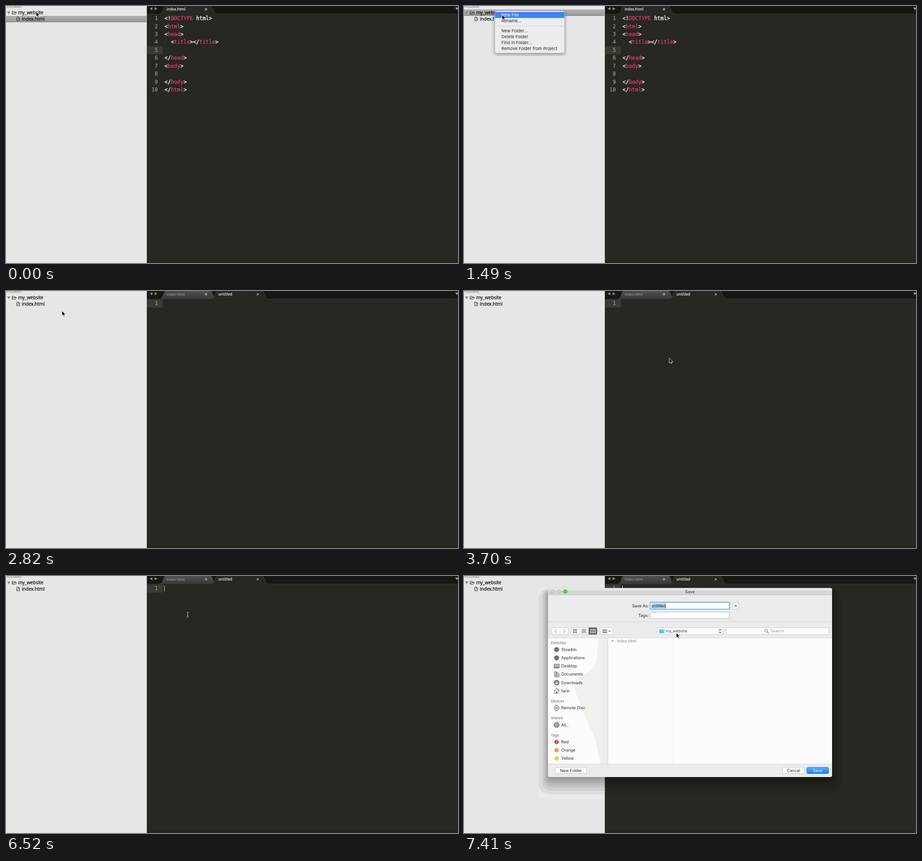
An HTML page with a canvas for the animation above (8 s loop, 991 px wide and 565 px high).

```html
<!DOCTYPE html>
<html lang="en">
<head>
<meta charset="utf-8">
<title>New file in the editor</title>
<style>
  html, body { margin: 0; width: 100%; height: 100%; overflow: hidden; background: #272822; }
  canvas { display: block; }
</style>
</head>
<body>
<canvas id="stage" width="991" height="565"></canvas>
<script>
const c = document.getElementById('stage').getContext('2d');
const LOOP = 8000;
const UI = 'Inter, Roboto, sans-serif';
const TREE = '"Open Sans", "Noto Sans", sans-serif';
const MONO = '11.55px "DejaVu Sans Mono", monospace';

const CODE = ['<!DOCTYPE html>', '<html>', '<head>', '  <title></title>', '',
  '</head>', '<body>', '', '</body>', '</html>'];

// Pointer moves: first step, last step, number of steps, end point
const START = [66, 12.5];
const MOVES = [
  [1050, 1640, 5, 93, 22.5],
  [2820, 3110, 3, 208, 104],
  [3410, 3700, 3, 450, 147.5],
  [4750, 5780, 8, 398, 81],
  [6820, 7410, 5, 465.5, 125]
];

function rect(x, y, w, h, fill) {
  c.fillStyle = fill;
  c.fillRect(x, y, w, h);
}

function box(x, y, w, h, r, fill, stroke) {
  c.beginPath();
  c.roundRect(x, y, w, h, r);
  paint(fill, stroke);
}

function dot(x, y, r, fill, stroke) {
  c.beginPath();
  c.arc(x, y, r, 0, 7);
  paint(fill, stroke);
}

function paint(fill, stroke, width = 1) {
  if (fill) { c.fillStyle = fill; c.fill(); }
  if (stroke) { c.strokeStyle = stroke; c.lineWidth = width; c.stroke(); }
}

function shape(d, fill, stroke, width = 1, x = 0, y = 0) {
  const p = new Path2D(d);
  c.save();
  c.translate(x, y);
  if (fill) { c.fillStyle = fill; c.fill(p); }
  if (stroke) { c.strokeStyle = stroke; c.lineWidth = width; c.stroke(p); }
  c.restore();
}

function text(s, x, y, font, color, align = 'left', weight = 0) {
  c.font = font;
  c.fillStyle = c.strokeStyle = color;
  c.textAlign = align;
  c.fillText(s, x, y);
  if (weight) {
    c.lineWidth = weight;
    c.strokeText(s, x, y);
  }
}

function fade(y0, y1, a, b) {
  const g = c.createLinearGradient(0, y0, 0, y1);
  g.addColorStop(0, a);
  g.addColorStop(1, b);
  return g;
}

function pointer(t) {
  let [x, y] = START;
  for (const [from, to, n, tx, ty] of MOVES) {
    if (t < from) break;
    const gap = (to - from) / (n - 1);
    const p = Math.min(1, (Math.floor((t - from) / gap + 0.01) + 1) / n);
    const e = p * p * (3 - 2 * p);
    x += (tx - x) * e;
    y += (ty - y) * e;
  }
  return [x, y];
}

function drawTree(selected) {
  rect(0, 0, 309, 565, '#e6e6e6');
  if (selected) {
    const y = selected === 'folder' ? 8 : 22;
    rect(0, y, 309, 13.5, fade(y, y + 13.5, '#b3b3b3', '#979797'));
    rect(0, y, 309, 1, '#999');
    rect(0, y + 12.5, 309, 1, '#858585');
  }
  rect(308, 0, 1, 565, '#b4b4b4');
  text('FOLDERS', 1, 3.6, '600 7.5px ' + TREE, '#7d7d7d');
  shape('M2.5 12H9.5L6 18Z', '#858585');
  shape('M13.5 18V11.5H16.5L17.5 12.8H21V14.5M13.5 18L15.8 14.5H23L20.8 18Z', null, '#333');
  text('my_website', 26.7, 18, '10.1px ' + TREE, '#000', 'left', 0.25);
  shape('M23.5 24.5H27.8L29.8 26.6V32.5H23.5ZM27.5 24.5V27H29.8', null, '#333');
  shape('M25.8 28L24.8 29.2L25.8 30.5M27.3 28L28.4 29.2L27.3 30.5', null, '#333', 0.8);
  text('index.html', 34.7, 32, '10.1px ' + TREE, '#000', 'left', 0.25);
}

function drawTab(x, label, active, mark) {
  const d = 'M-4 17.5C2 16 3 10 5.5 4Q7 0 9 -1H107Q109 0 111 4C114 10 115 16 120 17.5';
  shape(d, active ? '#272822' : fade(0, 17, '#50514d', '#393a36'), '#4a4b45', 0.8, x, 0);
  if (active) rect(x - 3, 17, 122, 1.5, '#272822');
  text(label, x + 11, 10, (active ? '600 ' : '') + '8px ' + TREE, active ? '#f2f2ee' : '#b4b5af');
  if (mark === 'dot') dot(x + 97.5, 7.2, 2.6, '#91928c');
  else shape('M-2 -2L2 2M2 -2L-2 2', null, '#a9aaa4', 1.3, x + 97.5, 7.2);
}

function drawEditor(untitled, caret) {
  rect(309, 0, 682, 565, '#272822');
  rect(309, 0, 682, 17, '#161712');
  rect(309, 17, 682, 1, '#32332d');
  rect(309, 560, 682, 5, '#24251f');
  shape('M321 2.5V9.5L315 6Z', '#8b8c87');
  shape('M326 2.5V9.5L332 6Z', '#8b8c87');
  shape('M985 3.5H992L988.5 9Z', '#a5a6a0');
  drawTab(341, 'index.html', !untitled, 'dot');
  if (untitled) drawTab(454.5, 'untitled', true, 'cross');

  const lines = untitled ? [''] : CODE;
  rect(309, untitled ? 19 : 88.5, 35, 17.4, '#393a32');
  if (!untitled) rect(348, 71.5, 1, 17, '#3b3c36');
  lines.forEach((line, i) => {
    const y = 31.2 + i * 17.42;
    text(i + 1, 333, y, MONO, '#97988f', 'right', 0.2);
    let x = 347.5;
    for (const part of line.split(/((?<=[<!\/])\w+)/)) {
      const tag = /^\w+$/.test(part);
      text(part, x, y, MONO, tag ? '#f43c7e' : '#f8f8f2', 'left', tag ? 0.15 : 0.4);
      x += c.measureText(part).width;
    }
  });
  if (caret) rect(347, 21, 1, 13, '#d8d8d2');
}

function drawMenu(hot) {
  c.save();
  c.beginPath();
  c.rect(59, 9, 167, 101);
  c.clip();
  c.shadowColor = 'rgba(0,0,0,.38)';
  c.shadowBlur = 9;
  c.shadowOffsetY = 3;
  box(67.5, 10.5, 153, 93, 4, '#ededed');
  c.restore();
  box(67.5, 10.5, 153, 93, 4, null, '#b9b9b9');
  if (hot) rect(68, 13, 152, 13.3, '#3b86f7');
  rect(68, 43.5, 152, 1, '#d2d2d2');
  const items = [['New File', 19.5], ['Rename...', 33], ['New Folder...', 54.2],
    ['Delete Folder', 67.5], ['Find in Folder...', 80.7], ['Remove Folder from Project', 94]];
  items.forEach(([s, y], i) =>
    text(s, 82, y + 3.3, '9.35px ' + UI, hot && i === 0 ? '#fff' : '#262626'));
}

function drawShadow() {
  rect(163, 26, 145, 463, '#eaeaea');
  const insets = [0, 8, 12, 15, 17, 19, 20];
  const bottoms = [480, 472, 465, 460, 455, 450, 446];
  insets.forEach((d, i) => {
    const top = 27 + i;
    box(163 + d, top, 665 - 2 * d, bottoms[i] - top, 24 - d * 0.7, 'rgba(0,0,0,.06)');
  });
}

function drawToolbar() {
  const edge = '#cfcfcf', ink = '#555';
  box(192.5, 113.5, 36, 15, 3, '#fcfcfc', edge);
  rect(210, 114, 1, 14, '#dedede');
  shape('M203 117.5L199 121L203 124.5M218 117.5L222 121L218 124.5', null, '#a5a5a5', 1.1);
  box(234.5, 113.5, 57, 15, 3, '#fcfcfc', edge);
  rect(253, 114, 1, 14, '#dedede');
  box(273, 113, 19, 16, [0, 3, 3, 0], '#696969');
  box(298.5, 113.5, 28, 15, 3, '#fcfcfc', edge);
  for (const dx of [0, 4.6]) for (const dy of [0, 4.6]) {
    rect(239.5 + dx, 117.3 + dy, 3, 3, ink);
  }
  for (let i = 0; i < 4; i++) rect(258, 117 + i * 2.5, 10, 1, ink);
  shape('M277.5 117.5H288V124.5H277.5ZM281 117.5V124.5M284.5 117.5V124.5', null, '#fff');
  for (let i = 0; i < 3; i++) {
    rect(304 + i * 3.6, 117.5, 2.4, 3, ink);
    rect(304 + i * 3.6, 122, 2.4, 3, ink);
  }
  shape('M317 120L319 122.2L321 120', null, '#333', 1.1);
  box(423.5, 113.5, 144, 15, 3, '#fcfcfc', edge);
  shape('M428 117H432.5L433.5 118H439.5V126H428Z', '#62bfee');
  rect(428, 119.3, 11.5, 0.8, '#9ad8f5');
  text('my_website', 442, 124.2, '8.7px ' + UI, '#444');
  shape('M559 119.5L561.5 117L564 119.5M559 122.5L561.5 125L564 122.5', null, '#444', 1.1);
  box(574.5, 113.5, 225, 15, 3, '#fcfcfc', edge);
  dot(662.5, 120.3, 3.1, null, '#666');
  shape('M664.8 122.6L667.5 125.5', null, '#666', 1.2);
  text('Search', 672, 124.2, '8.9px ' + UI, '#9a9a9a');
}

function drawPlaces() {
  const ink = '#747474';
  const heads = [['Favorites', 146.5], ['Devices', 274.5], ['Shared', 312], ['Tags', 349.5]];
  for (const [s, y] of heads) text(s, 190.5, y + 3, '500 7.6px ' + UI, '#777');
  const rows = [['Stowbin', 162], ['Applications', 180], ['Desktop', 198], ['Documents', 216],
    ['Downloads', 234.3], ['tarin', 252.5], ['Remote Disc', 290], ['All...', 327.5],
    ['Red', 365], ['Orange', 383], ['Yellow', 401]];
  for (const [s, y] of rows) text(s, 213.3, y + 3.3, '8.9px ' + UI, '#2b2b2b');
  dot(203, 161.7, 5.5, ink);
  dot(203, 180, 5.5, ink);
  box(197.5, 193.5, 11.5, 9, 0.5, '#c9c9c9', ink);
  rect(198, 195.5, 11, 1, ink);
  rect(198, 199.5, 11, 2, ink);
  shape('M198 210.5H203V221H198ZM201.5 212.5H206L208.5 215V222H201.5Z', '#dcdcdc', ink);
  shape('M203.5 215.5H206M203.5 217.5H207M203.5 219.5H207', null, ink, 0.8);
  dot(203, 234.3, 6, ink);
  shape('M203 230.5V236.5M200.3 234.5L203 237.3L205.7 234.5', null, '#fff', 1.5);
  shape('M197 253L203 247L209 253M198.8 252V258H207.2V252M206.5 247V250', null, ink, 1.1);
  rect(201.5, 253.5, 3, 4.5, ink);
  dot(203, 290, 5.6, '#d4d4d4', ink);
  dot(203, 290, 1.6, '#fff', ink);
  shape('M199.2 286.5L201.5 288.8M204.5 291.3L207 293.7', null, '#999');
  dot(203, 327.5, 5.8, '#858585', ink);
  shape('M199 325Q203 329 207 325M198.5 329Q203 326 207.5 330M203 322Q200 327 203 333', null, '#ddd', 0.9);
  dot(203, 365, 4.1, '#ee4b4e', '#d94043');
  dot(203, 383, 4.1, '#f8a044', '#e58e36');
  dot(203, 401, 4.1, '#fbd03d', '#e6bb30');
}

function button(x, w, label, primary) {
  box(x + 0.5, 420.5, w - 1, 14, 3, primary ? fade(420, 435, '#5eb2fb', '#1479fb') : '#fff',
    primary ? '#2c83ee' : '#c2c2c2');
  text(label, x + w / 2, 431, '8.8px ' + UI, primary ? '#fff' : '#222', 'center');
}

function drawDialog(loaded) {
  drawShadow();
  c.save();
  c.beginPath();
  c.roundRect(184, 26.5, 623, 415.5, 4);
  c.clip();
  rect(184, 26, 623, 416, '#ebebeb');
  rect(184, 26, 623, 15.5, '#d5d5d5');
  rect(184, 27, 623, 5, '#e6e6e6');
  rect(184, 41, 623, 1, '#c3c3c3');
  rect(184, 100, 623, 1, '#d5d5d5');
  rect(184, 135.5, 623, 278, '#fcfcfc');

  // Translucent side column
  shape('M294 136Q294 165 289 190Q286 203 272 211L263 216Q255 219 250 227Q242 232 242 243' +
    'Q245 260 256 285Q265 312 283 347Q290 365 293 385L299 413H316V136Z', '#f1f0ec');
  const g = c.createLinearGradient(298, 0, 316, 0);
  g.addColorStop(0, 'rgba(236,236,236,0)');
  g.addColorStop(1, '#ebebeb');
  rect(298, 136, 18, 277, g);
  rect(315, 136, 1, 277, '#d6d6d6');
  rect(458, 136, 1, 277, '#ebebeb');
  rect(184, 135.5, 623, 1, '#d2d2d2');
  rect(184, 413, 623, 1, '#d2d2d2');
  c.restore();

  dot(194, 34.2, 4.2, '#d0d0d0', '#b5b5b5');
  dot(208, 34.2, 4.2, '#d0d0d0', '#b5b5b5');
  dot(222, 34.2, 4.2, '#5fc943', '#4eae37');
  text('Save', 495.3, 37.6, '9.1px ' + UI, '#333', 'center');

  text('Save As:', 405, 69.3, '8.9px ' + UI, '#222', 'right');
  text('Tags:', 405, 90, '8.9px ' + UI, '#222', 'right');
  box(408.5, 58.5, 173, 14, 0, '#fff', '#b9b9b9');
  box(408.5, 79.5, 173, 14, 0, '#fff', '#b9b9b9');
  if (loaded) {
    c.beginPath();
    c.roundRect(408, 57.5, 174, 15.5, 1);
    paint(null, '#82b3e8', 2.2);
  }
  rect(411, 60, 32, 11.5, '#aacff8');
  text('untitled', 411, 69.3, '8.9px ' + UI, '#222');
  box(588.5, 58.5, 14, 14, 3, '#fff', '#c2c2c2');
  shape('M593.2 67L595.7 64.5L598.2 67', null, '#333', 1.2);

  drawToolbar();
  button(200, 69, 'New Folder');
  button(698, 49, 'Cancel');
  button(751, 49, 'Save', true);
  if (loaded) {
    drawPlaces();
    dot(325.5, 142.5, 2, '#d99a8c');
    text('index.html', 335, 146, '8.8px ' + UI, '#868686');
  }
}

function drawPointer(x, y) {
  shape('M0 0V11L2.6 8.7L4.4 12.5L6.2 11.7L4.5 8H8Z', '#0b0b0b', '#f4f4f4', 0.9, x, y);
}

function drawBeam(x, y) {
  const d = 'M-2.5 -5.5Q0 -5.5 0 -4Q0 -5.5 2.5 -5.5M0 -4V4M-2.5 5.5Q0 5.5 0 4Q0 5.5 2.5 5.5M-1.5 1H1.5';
  shape(d, null, '#151612', 2.2, x, y);
  shape(d, null, '#e4e4e0', 0.9, x, y);
}

function draw(t) {
  const untitled = t >= 2670;
  drawTree(t < 900 ? 'file' : untitled ? null : 'folder');
  drawEditor(untitled, t >= 6080);
  if (t >= 600 && !untitled) drawMenu(t >= 1050 && (t < 2380 || t >= 2530));
  if (t >= 6670) drawDialog(t >= 6820);
  if (t >= 6080 && t < 6670) drawBeam(398.5, 85);
  else drawPointer(...pointer(t));
}

function loop() {
  draw(performance.now() % LOOP);
  requestAnimationFrame(loop);
}
loop();
</script>
</body>
</html>
```
